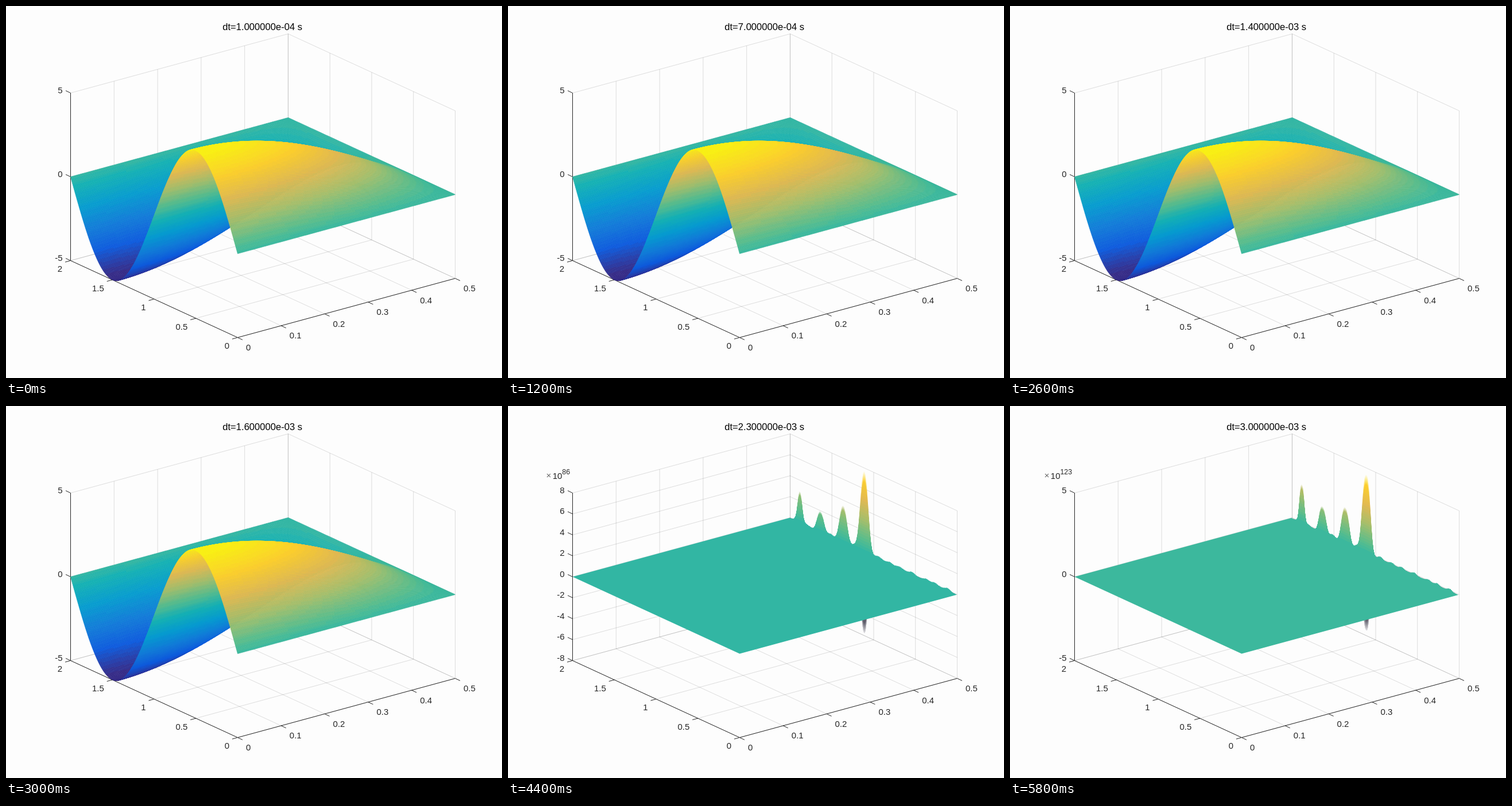
An HTML page with a canvas that plays this animation: 864 px wide and 648 px high, repeating every 6 s.

```html
<!DOCTYPE html>
<html lang="en">
<head>
<meta charset="utf-8">
<title>Wave surface by time step</title>
<style>
html, body { margin: 0; width: 864px; height: 648px; overflow: hidden; background: #fdfdfd; }
canvas { display: block; }
</style>
</head>
<body>
<canvas id="stage" width="864" height="648"></canvas>
<script>
const W = 864, H = 648, STEP = 200, COUNT = 30, SCALE = 146;
const FONT = '"Liberation Sans", Arial, sans-serif';
const ctx = document.getElementById('stage').getContext('2d');

const lerp = (a, b, f) => a + (b - a) * f;
const hash = n => Math.abs(Math.sin(n * 12.9898) * 43758.5453) % 1;

// Evenly spaced stops of the colour map, sampled in 64 flat bands
const STOPS = [
  '#352a87', '#0f5cdd', '#127dd8', '#079ccf', '#15b1b4',
  '#59bd8c', '#a5be6b', '#e1b952', '#fcce2e', '#f8f016'
].map(h => [1, 3, 5].map(i => parseInt(h.slice(i, i + 2), 16)));

function shade(band, alpha = 1) {
  const p = Math.max(0, Math.min(63, Math.floor(band))) / 7;
  const i = Math.min(8, Math.floor(p));
  const rgb = STOPS[i].map((v, c) => Math.round(lerp(v, STOPS[i + 1][c], p - i)));
  return `rgba(${rgb},${alpha})`;
}

// t: 0..0.5 (right axis), x: 0..2 (left axis), z: -1..1 of the vertical range
const project = (t, x, z) => [403.5 + 758 * t - 145.5 * x, 431.5 - 206 * t - 67 * x - SCALE * z];

function line(a, b) {
  ctx.beginPath();
  ctx.moveTo(...a);
  ctx.lineTo(...b);
  ctx.stroke();
}

function shape(c, pts) {
  c.beginPath();
  pts.forEach(p => c.lineTo(...p));
  c.closePath();
  c.fill();
}

function label(s, x, y, align, size = 15) {
  ctx.font = `${size}px ${FONT}`;
  ctx.textAlign = align;
  ctx.fillText(s, x, Math.round(y));
}

function buildWave() {
  const layer = document.createElement('canvas');
  layer.width = W;
  layer.height = H;
  const c = layer.getContext('2d');
  const nt = 140, nx = 280;
  const height = (i, j) => Math.sin(2 * Math.PI * j / nx) * Math.cos(Math.PI * i / nt / 2);
  const at = (i, j) => project(i / nt / 2, j / nx * 2, height(i, j));
  c.lineWidth = 0.6;
  for (let i = nt - 1; i >= 0; i--) {
    for (let j = nx - 1; j >= 0; j--) {
      c.fillStyle = c.strokeStyle = shade((height(i + 0.5, j + 0.5) + 1) * 32);
      shape(c, [at(i, j), at(i + 1, j), at(i + 1, j + 1), at(i, j + 1)]);
      c.stroke();
    }
  }
  return layer;
}

function axes(limit, step, power) {
  const ticks = [];
  for (let z = -limit; z <= limit + 1e-9; z += step) ticks.push(z);

  ctx.lineWidth = 1;
  ctx.strokeStyle = 'rgba(38,38,38,0.15)';
  for (let i = 0; i <= 5; i++) {
    const t = i / 10;
    line(project(t, 0, -1), project(t, 2, -1));
    line(project(t, 2, -1), project(t, 2, 1));
  }
  for (let i = 0; i <= 4; i++) {
    const x = i / 2;
    line(project(0, x, -1), project(0.5, x, -1));
    line(project(0.5, x, -1), project(0.5, x, 1));
  }
  for (const z of ticks) {
    line(project(0, 2, z / limit), project(0.5, 2, z / limit));
    line(project(0.5, 2, z / limit), project(0.5, 0, z / limit));
  }

  ctx.strokeStyle = ctx.fillStyle = '#262626';
  line(project(0, 2, 1), project(0, 2, -1));
  line(project(0, 2, -1), project(0, 0, -1));
  line(project(0, 0, -1), project(0.5, 0, -1));
  for (let i = 0; i <= 5; i++) {
    const [px, py] = project(i / 10, 0, -1);
    line([px, py], [px + 8.5, py + 4]);
    label(String(i / 10), px + 14.5, py + 22.4, 'left');
  }
  for (let i = 0; i <= 4; i++) {
    const [px, py] = project(0, i / 2, -1);
    line([px, py], [px - 9.5, py + 2.6]);
    label(String(i / 2), px - 14.5, py + 19.8, 'right');
  }
  for (const z of ticks) {
    const [px, py] = project(0, 2, z / limit);
    line([px, py], [px - 8.5, py - 4]);
    label(String(+z.toFixed(1)), px - 14, py, 'right');
  }
  if (power) {
    label(power, 108, 119, 'right', 12.3);
    const left = 108 - ctx.measureText(power).width;
    label('10', left, 127, 'right');
    ctx.fillStyle = '#666';
    label('×', left - 19, 126, 'right');
  }
}

// Main peaks on the far edge: screen x, early height, late height, half width
const PEAKS = [
  [508.5, 0.37, 0.49, 5.5], [544.5, 0.23, 0.31, 8],
  [584, 0.44, 0.44, 9], [620.5, 1, 1, 9.5]
];
const bump = (d, w, sharp) => Math.exp(-Math.pow(Math.abs(d) / w, sharp));

// Edge height at screen x: the peaks over a row of small random bumps
function ripple(x, mix) {
  const sharp = 2.4 + 0.4 * mix;
  let h = 0;
  for (const [at, early, late, w] of PEAKS) h += lerp(early, late, mix) * bump(x - at, w, sharp);
  for (let i = 0; i < 14; i++) {
    const at = 498 + i * 20.5 + 6 * hash(i + 1);
    h += (0.025 + 0.02 * hash(i + 40)) * bump(x - at, 8 - 2 * mix, 2);
  }
  return h;
}

// Growth of the explicit scheme once dt exceeds the grid spacing of 0.002
function growth(dt) {
  const steps = Math.floor(0.5 / dt + 1e-9);
  const log = steps * 2 * Math.acosh(dt / 0.002) / Math.LN10 - 15.112;
  const power = Math.floor(log);
  const size = 10 ** (log - power);
  const limit = [1.5, 2, 3, 4, 5, 6, 8, 10].find(v => size <= v);
  const step = limit < 2 ? 0.5 : limit < 5 ? 1 : limit % 5 ? 2 : 5;
  const unit = limit === 10 ? 10 : 1;
  return {
    limit: limit / unit, step: step / unit, power: power + (unit > 1),
    height: size / limit, end: steps * dt
  };
}

function drawUnstable(k, dt) {
  const g = growth(dt);
  const mix = Math.max(-0.3, (k - 22) / 7);
  const zero = k < 26 ? 31 : 32;
  const tall = SCALE * g.height;
  axes(g.limit, g.step, String(g.power));

  const right = project(g.end, 0, 0), back = project(g.end, 2, 0);
  const slope = (right[1] - back[1]) / (right[0] - back[0]);
  const columns = [];
  for (let x = Math.ceil(back[0]); x < right[0]; x++) {
    columns.push({ x, y: back[1] + (x - back[0]) * slope, h: tall * ripple(x + 0.5, mix) });
  }

  // Downward spikes; the sheet hides all but their tips
  for (const { x, y, h } of columns) {
    const fade = ctx.createLinearGradient(0, y + h * 0.87, 0, y + h);
    fade.addColorStop(0, 'rgba(66,64,80,0.85)');
    fade.addColorStop(1, 'rgba(66,64,80,0.15)');
    ctx.fillStyle = fade;
    ctx.fillRect(x, y, 1, h);
  }

  ctx.fillStyle = shade(zero);
  shape(ctx, [project(0, 0, 0), right, back, project(0, 2, 0)]);

  // Upward spikes thin out towards their tips
  for (const { x, y, h } of columns) {
    const fadeLength = Math.max(1, h * 0.13);
    for (let d = 0; d < h; d++) {
      ctx.fillStyle = shade(zero + 28 * d / tall, Math.min(1, (h - d) / fadeLength));
      ctx.fillRect(x, Math.round(y) - d, 1, 1);
    }
  }
}

const wave = buildWave();

function draw(k) {
  const dt = (k + 1) * 1e-4;
  ctx.fillStyle = '#fdfdfd';
  ctx.fillRect(0, 0, W, H);
  if (k < 20) {
    axes(5, 5, '');
    ctx.drawImage(wave, 0, 0);
  } else {
    drawUnstable(k, dt);
  }
  ctx.fillStyle = '#000';
  const text = dt.toExponential(6).replace(/-(\d)$/, '-0$1');
  label(`dt=${text} s`, 446.7, 42, 'center', 16.6);
}

const start = performance.now();
let shown = -1;
function tick() {
  const k = Math.floor((performance.now() - start) / STEP) % COUNT;
  if (k !== shown) draw(shown = k);
  requestAnimationFrame(tick);
}
tick();
</script>
</body>
</html>
```
